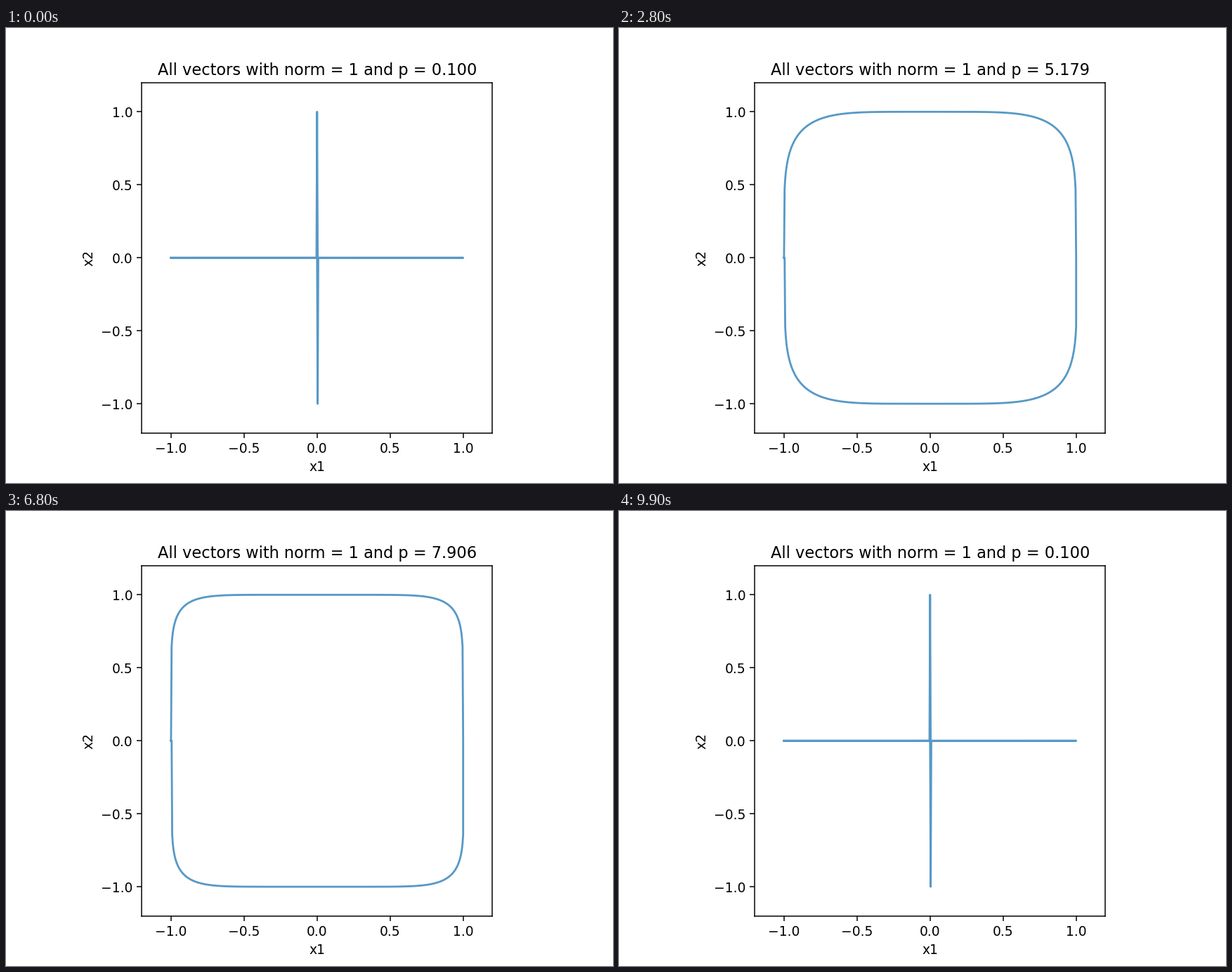
A matplotlib script for the animation above (10000 ms loop, 864 px wide and 648 px high).

```python
import matplotlib.pyplot as plt
import numpy as np
from matplotlib.animation import FuncAnimation

plt.rcParams["font.family"] = "DejaVu Sans"

STEPS = 50
rising = np.logspace(-1, 2, STEPS)
powers = np.concatenate([rising, rising[::-1]])

x = np.linspace(-1, 1, 501)


def unit_curve(p):
    """Outline of the p-norm unit ball, upper half first."""
    y = (1 - np.abs(x) ** p) ** (1 / p)
    # The lower half sits one sample to the right and closes at (-1, 0).
    lower_y = np.append(-y[1:], 0)
    return np.concatenate([x, x[::-1]]), np.concatenate([y, lower_y])


fig, ax = plt.subplots(figsize=(6.4, 4.8), dpi=135)
ax.set_aspect("equal")
ax.set_xlim(-1.2, 1.2)
ax.set_ylim(-1.2, 1.2)
ticks = np.arange(-1, 1.1, 0.5)
ax.set_xticks(ticks)
ax.set_yticks(ticks)
ax.set_xlabel("x1")
ax.set_ylabel("x2")
title = ax.set_title("")
line, = ax.plot([], [], color="#1f77b4", lw=1.5, alpha=0.75)


def draw(i):
    p = powers[i]
    line.set_data(*unit_curve(p))
    title.set_text(f"All vectors with norm = 1 and p = {p:.3f}")
    return line, title


anim = FuncAnimation(fig, draw, frames=len(powers), interval=100,
                     repeat=True, repeat_delay=0)
plt.show()
```
